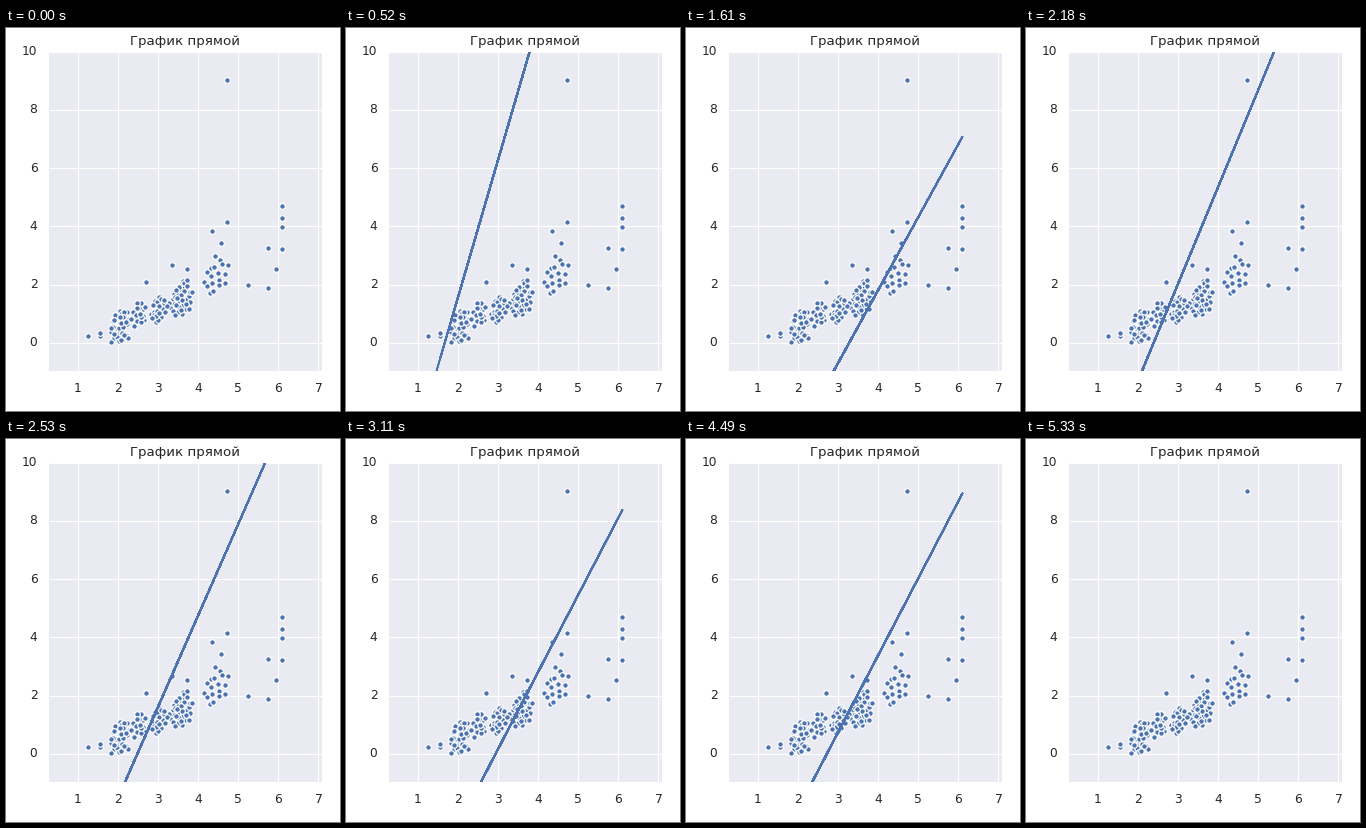
Animation, 334 px wide and 383 px high, one loop 5.38 s. Source, as a matplotlib script:

```python
import numpy as np
import matplotlib.pyplot as plt
from matplotlib.animation import FuncAnimation
from matplotlib.patches import Rectangle

W, H, DPI = 334, 383, 100
LOOP, TICK = 5380, 10
LEFT, TOP, RIGHT, BOTTOM = 43, 24, 316, 343
BLUE, INK, PANEL = "#4C72B0", "#262626", "#EAEAF2"
LAST_STEP = 27

plt.rcParams["font.family"] = "DejaVu Sans"
plt.rcParams["path.simplify"] = False
rng = np.random.default_rng(7)


def pt(px):
    return px * 72 / DPI


def sx(v):
    return 71.6 + 40.14 * (v - 1)


def sy(v):
    return 314.8 - 29.12 * v


def blob(count, x, y, rx, ry, tilt=-0.5):
    """Loose, evenly filled ellipse of dots that leans along the trend."""
    i = np.arange(count)
    r = np.sqrt((i + 0.5) / count)
    a = i * np.pi * (3 - np.sqrt(5))
    dx = rx * r * np.cos(a) + rng.normal(0, 0.8, count)
    dy = ry * r * np.sin(a) + rng.normal(0, 1.5, count)
    return np.column_stack([x + dx, y + dy + tilt * dx]).round()


outliers = [(82, 308), (94, 305), (94, 308), (105, 314), (122, 310),
            (140, 254), (166, 237), (181, 241), (206, 203), (215, 215),
            (221, 52), (221, 194), (242, 257), (262, 220), (262, 260),
            (270, 241), (276, 178), (276, 190), (276, 199), (276, 221)]
dots = 0.4 + np.vstack([
    outliers,
    blob(42, 114, 297, 9, 15),
    blob(18, 133, 286, 7, 12),
    blob(24, 153, 281, 9, 14),
    blob(40, 175, 271, 11, 18),
    blob(18, 210, 247, 13, 20),
])
rng.shuffle(dots)


def step_at(ms):
    """Number of fitting steps shown so far."""
    times = [100, 520, 1340, 1610, 2530, 3110, 3750, 4490, 4760, 5330]
    steps = [1, 4, 8, 9, 14, 17, 20, 24, 25, 28]
    return int(np.interp(ms, times, steps, left=0) + 1e-9)


def fit_line(step):
    """The line swings around its rest place and settles, then drifts off."""
    swing = 38.1 * 0.871 ** (step - 4) * (-1) ** step
    foot = np.interp(step, [24, 27], [128.6, 104]) - swing
    pivot = np.interp(step, [4, 9, 14, 17, 24, 27],
                      [545.5, 554.5, 542.5, 542, 525, 432])
    slope = (pivot - BOTTOM) / (foot - sx(0))
    return BOTTOM - slope * (dots[:, 0] - foot)


fig = plt.figure(figsize=(W / 100, H / 100), dpi=DPI, facecolor="white")
ax = fig.add_axes([0, 0, 1, 1])
ax.set_xlim(0, W)
ax.set_ylim(H, 0)
ax.axis("off")

panel = Rectangle((LEFT, TOP), RIGHT - LEFT, BOTTOM - TOP,
                  facecolor=PANEL, linewidth=0, zorder=0)
ax.add_patch(panel)


def label(x, y, text, size, align="center"):
    ax.text(x, y, text, fontsize=pt(size), color=INK, ha=align, va="baseline")


def grid(xs, ys):
    ax.plot(xs, ys, color="white", lw=pt(1.11), solid_capstyle="butt",
            zorder=0.5)


for v in range(1, 8):
    grid([sx(v)] * 2, [TOP, BOTTOM])
    label(sx(v), 364.3, str(v), 12.2)
for v in range(0, 11, 2):
    grid([LEFT, RIGHT], [sy(v)] * 2)
    label(31.5, sy(v) + 3.6, str(v), 12.2, "right")
label((LEFT + RIGHT) / 2, 17.3, "График прямой", 13.33)

ax.scatter(dots[:, 0], dots[:, 1], s=pt(5.6) ** 2, color=BLUE,
           edgecolors="white", linewidths=pt(1.2), zorder=1)
line, = ax.plot([], [], color=BLUE, lw=pt(1.67), zorder=2)
line.set_clip_path(panel)


def draw(i):
    step = step_at(i * TICK)
    if 1 <= step <= LAST_STEP:
        line.set_data(dots[:, 0], fit_line(step))
    else:
        line.set_data([], [])
    return line,


anim = FuncAnimation(fig, draw, frames=LOOP // TICK, interval=TICK,
                     init_func=lambda: draw(0), repeat=True, repeat_delay=0)
plt.show()
```
